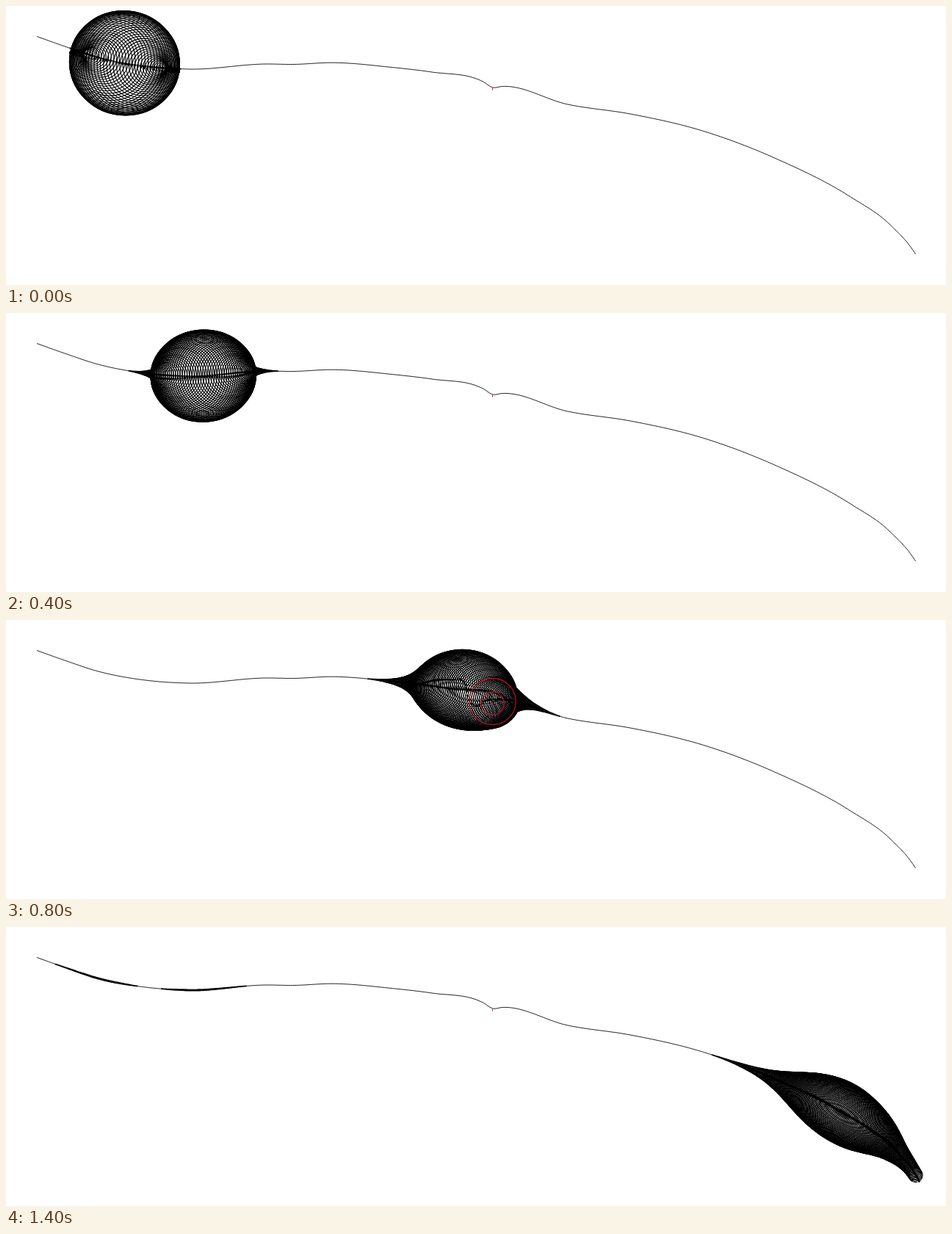
An HTML page with a canvas for the animation above (1500 ms loop, 1280x380 px).

```html
<!DOCTYPE html>
<html lang="en">
<head>
<meta charset="utf-8">
<title>Pulse on a fibre</title>
<style>
  html, body { margin: 0; width: 100%; height: 100%; overflow: hidden; background: #fff; }
  canvas { display: block; }
</style>
</head>
<body>
<canvas id="stage" width="1280" height="380"></canvas>
<script>
const ctx = document.getElementById('stage').getContext('2d');
const STEP_MS = 100, STEPS = 15, SPACING = 1.6, BRANCH_X = 663;

// Key points of the fibre, joined by a smooth curve y(x).
const knots = [
  [42, 41.5], [80, 55], [125, 69.8], [190, 82], [250, 86], [355, 79], [390, 79.5],
  [445, 77.2], [525, 83.5], [580, 90], [650, 103.3], [BRANCH_X, 111], [675, 109.6],
  [765, 134], [850, 147], [945, 169], [1050, 208.5], [1150, 260], [1205, 299], [1238.5, 338]
];

const chord = i => (knots[i + 1][1] - knots[i][1]) / (knots[i + 1][0] - knots[i][0]);

function slopeAt(i) {
  const end = knots.length - 1;
  if (i === 0) return chord(0);
  if (i === end) return 1.4 * chord(end - 1);
  const before = knots[i][0] - knots[i - 1][0], after = knots[i + 1][0] - knots[i][0];
  return (chord(i - 1) * after + chord(i) * before) / (before + after);
}

function heightAt(x) {
  let i = 0;
  while (i < knots.length - 2 && x > knots[i + 1][0]) i++;
  const [x0, y0] = knots[i], [x1, y1] = knots[i + 1];
  const w = x1 - x0, t = (x - x0) / w, u = 1 - t;
  return u * u * ((1 + 2 * t) * y0 + t * w * slopeAt(i)) +
         t * t * ((1 + 2 * u) * y1 - u * w * slopeAt(i + 1));
}

// Walk the curve and keep evenly spaced points with tangent and arc length.
function buildFibre() {
  const nodes = [], dx = 0.05;
  let s = 0, next = 0, last = knots[0][1];
  for (let x = knots[0][0] + dx; x <= knots.at(-1)[0]; x += dx) {
    const y = heightAt(x), dy = y - last, d = Math.hypot(dx, dy);
    s += d;
    last = y;
    if (s < next) continue;
    nodes.push({ x, y, tx: dx / d, ty: dy / d, s });
    next += SPACING;
  }
  return { nodes, length: s };
}

const { nodes, length } = buildFibre();
const branch = nodes.find(n => n.x >= BRANCH_X);

// The pulse runs to the pinned left end, turns there and crosses to the right,
// widening as it goes. The branch sends a faint echo back.
function radiusAt(k) {
  const centre = Math.abs(-125 + 89.3 * k + 0.04 * k * k);
  const height = 71 - 2.1 * k;
  const sigma = 24 + 1.8 * k + 0.075 * k * k;
  const bell = d => Math.exp(-d * d / (2 * sigma * sigma));
  const echo = 2 * branch.s - centre + 25;
  return s => {
    let r = height * (bell(s - centre) + bell(s + centre) + bell(s - 2 * length + centre));
    if (k > 8 && s < branch.s) r += 1.7 * (s - echo) / sigma * bell(s - echo);
    return Math.abs(r) * (1 - Math.exp(-s / 6));
  };
}

function ring(x, y, r) {
  ctx.beginPath();
  ctx.arc(x, y, r, 0, 2 * Math.PI);
  ctx.stroke();
}

function drawNode(n, r) {
  if (r < 0.4) return;
  ring(n.x, n.y, r);
  if (r < 3) return;
  for (const side of [-r, r])
    ctx.fillRect(n.x + side * n.tx - 1.3, n.y + side * n.ty - 1.3, 2.6, 2.6);
}

function drawStub(r) {
  ctx.strokeStyle = '#c81420';
  ctx.beginPath();
  ctx.moveTo(662.5, 112);
  ctx.lineTo(662.5, 114.5);
  ctx.stroke();
  if (r < 1) return;
  ring(662.5, 111, r * 0.93);
  ring(662.5, 113.5, r * 0.46);
}

function draw(k) {
  const radius = radiusAt(k);
  ctx.fillStyle = '#fff';
  ctx.fillRect(0, 0, 1280, 380);
  ctx.fillStyle = ctx.strokeStyle = '#000';
  ctx.lineWidth = 0.9;
  ctx.beginPath();
  nodes.forEach(n => ctx.lineTo(n.x, n.y));
  ctx.stroke();
  ctx.lineWidth = 1.1;
  nodes.forEach(n => drawNode(n, radius(n.s)));
  drawStub(radius(branch.s));
}

let shown = -1;
function tick() {
  const k = Math.floor(performance.now() / STEP_MS) % STEPS;
  if (k !== shown) draw(shown = k);
  requestAnimationFrame(tick);
}
tick();
</script>
</body>
</html>
```
